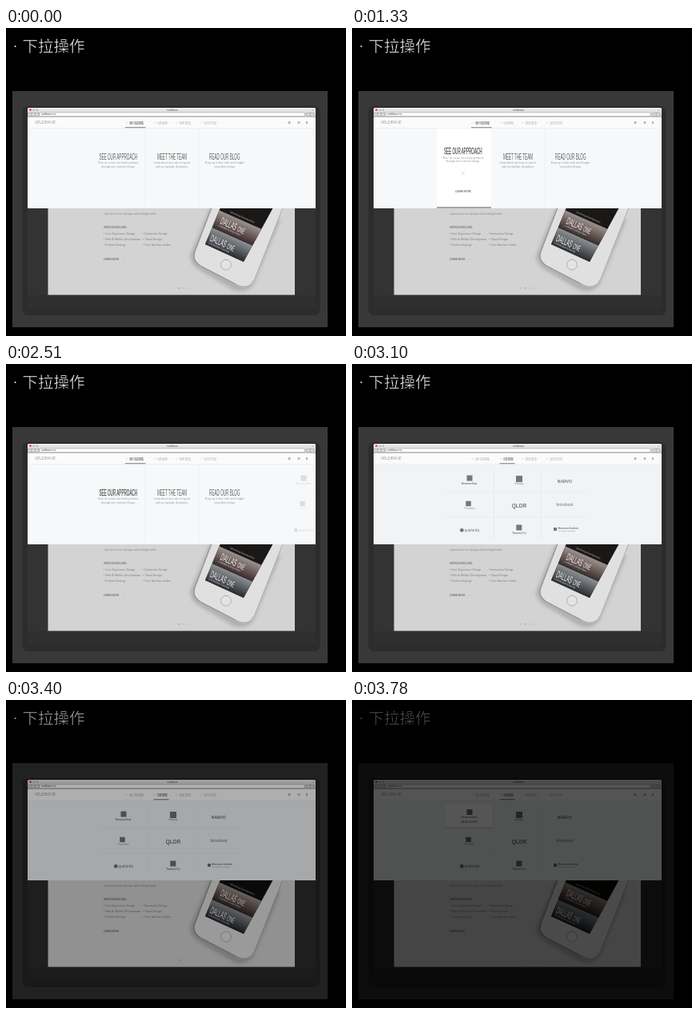
Animation of 425x386 px, one loop 3.88 s. Source, as an HTML page:

```html
<!DOCTYPE html>
<html lang="zh">
<head>
<meta charset="utf-8">
<title>下拉操作</title>
<style>
  html, body { margin: 0; width: 100%; height: 100%; overflow: hidden; background: #000; }
  svg { display: block; width: 425px; height: 386px; }
  text { white-space: pre; }
  .cjk { font-family: "Noto Sans CJK SC Light", "Noto Sans CJK SC", "Noto Sans CJK", sans-serif; font-weight: 300; }
  .sans { font-family: "Liberation Sans", Arial, sans-serif; }
  .serif { font-family: "Liberation Serif", serif; }
  .thin { font-family: Lato, sans-serif; font-weight: 300; }
  .b { font-weight: 700; }
</style>
</head>
<body>
<svg viewBox="0 0 425 386">
  <defs>
    <linearGradient id="bar" x2="0" y2="1">
      <stop stop-color="#eeeeee"/><stop offset="1" stop-color="#c5c5c5"/>
    </linearGradient>
    <linearGradient id="dusk" x2="0" y2="1">
      <stop stop-color="#9b9290"/><stop offset=".55" stop-color="#6a5855"/><stop offset="1" stop-color="#3a302f"/>
    </linearGradient>
    <linearGradient id="city" x2="0" y2="1">
      <stop stop-color="#8d9093"/><stop offset=".5" stop-color="#595c61"/><stop offset="1" stop-color="#25262a"/>
    </linearGradient>
    <filter id="soft" x="-20%" y="-20%" width="140%" height="140%"><feGaussianBlur stdDeviation="2"/></filter>
    <filter id="fade" filterUnits="userSpaceOnUse" x="0" y="0" width="425" height="386" color-interpolation-filters="sRGB">
      <feComponentTransfer>
        <feFuncR type="linear"/><feFuncG type="linear"/><feFuncB type="linear"/>
      </feComponentTransfer>
    </filter>
    <clipPath id="pageClip"><rect x="52.5" y="226" width="308.5" height="108.5"/></clipPath>
    <clipPath id="panelClip"><rect x="27" y="112" width="360" height="114"/></clipPath>
    <clipPath id="screenClip"><path d="M268 225 249 271 297 293 334 225Z"/></clipPath>
  </defs>
  <g id="stage">
    <rect width="425" height="386"/>
    <circle cx="11.5" cy="23" r="1" fill="#eee"/>
    <text class="cjk" x="20.5" y="30" font-size="19.5" fill="#f8f8f8" stroke="#000" stroke-width=".4">下拉操作</text>
    <rect x="8" y="79" width="394" height="296" fill="#383838"/>
    <rect x="20.5" y="98" width="372" height="262" rx="7" fill="#2c2c2c"/>
    <rect x="27" y="100" width="360" height="251" fill="#333"/>
    <rect x="27" y="335" width="360" height="16" fill="#2f2f2f"/>

    <g clip-path="url(#pageClip)">
      <rect x="52" y="226" width="309" height="109" fill="#d3d3d3"/>
      <g id="copy"></g>
      <path d="M255 226 231 283Q228 293 240 302L284 328Q298 334 309 322L343 240Z" fill="#8d8d8d" opacity=".5" filter="url(#soft)"/>
      <path d="M257 225 236 280Q232 291 243 298L287 321Q304 330 311 314L346 225Z" fill="#e0e0e0" stroke="#b0b0b0"/>
      <path d="M257 225 236 280Q232 291 243 298L287 321" fill="none" stroke="#989898" stroke-width="1.4"/>
      <g clip-path="url(#screenClip)">
        <g id="app" transform="translate(249 271) rotate(24)">
          <rect x="-20" y="-100" width="100" height="110" fill="#191817"/>
          <rect x="-20" y="-46" width="100" height="23" fill="url(#dusk)"/>
          <rect x="-20" y="-22.5" width="100" height="24" fill="url(#city)"/>
        </g>
      </g>
      <circle cx="275" cy="296.7" r="6.4" fill="#e4e4e4" stroke="#a9a9a9" stroke-width=".9"/>
    </g>

    <rect x="27" y="100" width="360" height="12.5" rx="1.5" fill="url(#bar)"/>
    <circle cx="30.5" cy="102.7" r="1.4" fill="#d94b43"/>
    <g fill="#dcdcdc" stroke="#888" stroke-width=".4">
      <circle cx="34.8" cy="102.7" r="1.2"/><circle cx="39" cy="102.7" r="1.2"/>
      <rect x="28" y="106.2" width="13" height="4"/>
      <rect x="42" y="106" width="331" height="4.3" fill="#fff"/>
      <rect x="376" y="106.2" width="4" height="4"/><rect x="380.5" y="106.2" width="4" height="4"/>
    </g>
    <path d="M32 106.2v4M36.5 106.2v4M382.5 104l2-2" stroke="#777" stroke-width=".5"/>
    <g id="chrome"></g>

    <rect x="27" y="112" width="360" height="114" fill="#f6f8f9" id="sheet"/>
    <g clip-path="url(#panelClip)">
      <g id="first"></g>
      <g id="second"></g>
    </g>
    <rect x="27" y="112" width="360" height="13.5" fill="#fafbfb"/>
    <path d="M27 125.5H387" stroke="#e8ebec" stroke-width=".6"/>
    <g id="nav"></g>
    <rect id="line" y="124" height="1.3" fill="#9a9a9a"/>
    <g fill="#b4b4b4">
      <rect x="352.7" y="117.2" width="2.8" height="2.8"/>
      <circle cx="366" cy="118.6" r="1.5"/>
      <rect x="375" y="117" width="2" height="3.2"/>
    </g>
  </g>
</svg>
<script>
const LOOP = 3880, NARROW = 0.44;
const STEPS = [0, 150, 300, 450, 600, 750, 890, 1040, 1190, 1330, 1480, 1630, 1780, 1930, 2080,
  2220, 2370, 2510, 2660, 2810, 2960, 3100, 3250, 3400, 3550, 3780];
const $ = id => document.getElementById(id);

function add(parent, tag, attrs, content) {
  const el = document.createElementNS('http://www.w3.org/2000/svg', tag);
  set(el, attrs);
  if (content) el.textContent = content;
  return parent.appendChild(el);
}
function set(el, attrs) {
  for (const k in attrs) el.setAttribute(k, attrs[k]);
}
const group = parent => add(parent, 'g', {});
const label = (parent, str, x, y, size, fill, cls = 'sans', anchor = 'start') =>
  add(parent, 'text', { x, y, 'font-size': size, fill, class: cls, 'text-anchor': anchor }, str);
const mid = (parent, str, x, y, size, fill, cls) => label(parent, str, x, y, size, fill, cls, 'middle');

// condensed capitals
function narrow(parent, str, x, y, size, fill, anchor = 'start') {
  const el = label(parent, str, 0, 0, size, fill, 'sans', anchor);
  set(el, { transform: `translate(${x} ${y}) scale(${NARROW} 1)` });
  return el;
}

// browser chrome and navigation
mid($('chrome'), 'veldrane', 208, 104, 3.6, '#555');
label($('chrome'), 'veldrane.is', 44, 109.4, 3.8, '#444');
label($('nav'), 'VELDRANE', 36, 120.4, 5.1, '#555', 'thin');
const items = [['WHY VELDRANE', 154.5], ['OUR WORK', 189.5], ['WHAT WE DO', 217], ['GET IN TOUCH', 247.5]]
  .map(([str, x]) => {
    add($('nav'), 'path', { d: `M${x - 5} 118.7h3`, stroke: '#ccc', 'stroke-width': .6 });
    return narrow($('nav'), str, x, 120.6, 5, '#a6a6a6');
  });

// page under the menu
const copy = $('copy');
label(copy, 'experiences for startups and leading brands.', 122, 234.3, 3.8, '#858585', 'serif');
label(copy, 'SERVICES INCLUDE:', 122, 251.2, 2.9, '#727272', 'sans b');
[['User Experience Design', 'Interaction Design'],
 ['Web & Mobile Development', 'Visual Design'],
 ['Product Strategy', 'User Interface Audits']].forEach((row, r) =>
  row.forEach((str, c) => label(copy, '• ' + str, 122 + c * 49, 258.8 + r * 7, 3.8, '#7c7c7c', 'serif')));
label(copy, 'LEARN MORE', 122, 291, 2.9, '#727272', 'sans b');
add(copy, 'path', { d: 'M145 290h4', stroke: '#b5b5b5', 'stroke-width': .5 });
const dots = group(copy);
for (let i = 0; i < 5; i++)
  add(i === 1 ? copy : dots, 'circle', { cx: 212 + i * 4.6, cy: 326, r: .8, fill: i === 1 ? '#808080' : '#b5b5b5' });

// phone captions
function caption(x, y, size, sub) {
  const app = $('app');
  narrow(app, 'DALLAS', x, y, size, '#f4f4f4');
  narrow(app, 'ONE', x + size * 1.85, y, size * .8, '#f4f4f4');
  label(app, sub, x, y + 3.6, 3, '#ddd');
}
caption(6, -31, 12.5, 'a Modern Living Place');
caption(3, -6, 12.5, 'a Downtown Evening');
label($('app'), 'Upcoming Entertainment', 12, -49, 3, '#ccc');

// first menu: three columns
const first = $('first');
add(first, 'path', { d: 'M173.5 126V225M241 126V225', stroke: '#edf0f2', 'stroke-width': .8 });
const card = group(first);
add(card, 'rect', { x: 106, y: 125.5, width: 68, height: 100.5, fill: '#fff' });
add(card, 'rect', { x: 106, y: 224, width: 68, height: 2.4, fill: '#a5a7a7' });
const columns = [
  ['SEE OUR APPROACH', 140.3, 'How we create successful products', 'through user centered design.'],
  ['MEET THE TEAM', 207.5, 'Learn about our team of experts', 'and our multiple disciplines.'],
  ['READ OUR BLOG', 273.3, 'Keep up to date with our thoughts', 'on product design.']
].map(([title, x, a, b]) => {
  const g = group(first);
  const head = narrow(g, title, x, 164.8, 10.5, '#626262', 'middle');
  mid(g, a, x, 170.3, 3.6, '#959595', 'serif');
  mid(g, b, x, 174.6, 3.6, '#959595', 'serif');
  return { g, head };
});
const more = group(first);
add(more, 'path', { d: 'M136.7 180.2l3.8 3.8m0-3.8l-3.8 3.8', stroke: '#b5b5b5', 'stroke-width': .5 });
mid(more, 'LEARN MORE', 139, 206, 3, '#777', 'sans b');

// second menu: nine clients
const second = $('second');
add(second, 'path', { d: 'M177.5 131V221M236.5 131V221M117 161H295M117 192H295', stroke: '#e6e9ea', 'stroke-width': .7 });
const tile = group(second);
add(tile, 'rect', { x: 117, y: 159, width: 58.5, height: 1.5, fill: '#c6c8c9' });
add(tile, 'rect', { x: 117, y: 131, width: 58.5, height: 28.5, fill: '#fff' });
const ink = '#757778';
const square = (g, x, y, s) => add(g, 'rect', { x: x - s / 2, y: y - s / 2, width: s, height: s, fill: ink });
const lead = group(second);
square(lead, 147, 143, 7);
mid(lead, 'Homemellow', 146.5, 150.7, 3.2, ink, 'sans b');
const study = mid(second, 'CASE STUDY', 146.5, 154, 3.3, '#777', 'sans b');
square(second, 209, 144, 8);
mid(second, 'Solvaryn', 209, 151.3, 2.8, ink);
mid(second, 'NARVO', 265.8, 149.4, 5, ink, 'sans b');
square(second, 145.5, 175, 6.5);
mid(second, 'Pendralis', 147, 182.4, 3.2, '#999');
mid(second, 'QLDR', 209, 179.6, 6.5, ink, 'sans b');
mid(second, 'brimdusk', 266, 178, 5.2, ink);
add(second, 'circle', { cx: 137.3, cy: 208.3, r: 2.4, fill: ink });
label(second, 'quelorda', 140.5, 210, 4.8, ink);
square(second, 208.8, 205, 7);
mid(second, 'Tomarsel Co', 208.8, 212.8, 2.9, ink, 'sans b');
square(second, 254, 207, 4);
label(second, 'Alvermoor Institute', 257.5, 207.3, 2.8, ink, 'sans b');
label(second, 'of Applied Wellness', 257.5, 210.2, 2.5, ink);

const clamp = v => Math.max(0, Math.min(1, v));
const smooth = (a, b, t) => { const u = clamp((t - a) / (b - a)); return u * u * (3 - 2 * u); };

function draw(t) {
  const hover = smooth(610, 1190, t) * (1 - smooth(1380, 1830, t));
  const strong = (t >= 600 && t < 1930) || t >= 2510;
  const u = clamp((t - 2510) / 450), slide = 1 - (1 - u) ** 4;
  const work = t >= 2660, entered = t >= 2510;

  set(card, { opacity: hover });
  set(more, { opacity: hover, transform: `translate(0 ${(1 - hover) * 8})` });
  set(columns[0].g, { transform: `translate(${-1.5 * hover} ${-6.4 * hover})` });
  set(columns[0].head, {
    fill: strong ? '#505050' : '#626262', stroke: '#505050',
    'stroke-width': strong ? .25 : 0
  });
  set(first, { transform: `translate(${-28 * slide} 0)`, opacity: clamp(1 - 2.2 * u) });
  set(second, { transform: `translate(${225 * (1 - slide)} 0)`, opacity: entered ? clamp(.2 + 2 * u) : 0 });
  set($('sheet'), { fill: u > .3 ? '#f1f3f4' : '#f6f8f9' });

  items.forEach((el, i) => {
    const on = i === (work ? 1 : 0);
    set(el, { fill: on ? '#606060' : '#a6a6a6', stroke: '#606060', 'stroke-width': on ? .15 : 0 });
  });
  set($('line'), { x: work ? 184.5 : 149, width: work ? 19 : 25.5 });

  const picked = t >= 3700 ? 1 : 0;
  set(tile, { opacity: picked });
  set(study, { opacity: picked });
  set(lead, { transform: `translate(0 ${-2.5 * picked})` });
  set(dots, { opacity: t >= 3250 ? .4 : 1 });

  // fade out: contrast falls steadily, blacks sink a little
  const fading = t >= 3250;
  if (fading) {
    const slope = .86 - .00094 * (t - 3250);
    for (const f of document.querySelectorAll('#fade feComponentTransfer > *')) set(f, { slope, intercept: -.025 });
  }
  set($('stage'), { filter: fading ? 'url(#fade)' : 'none' });
}

function tick() {
  const now = performance.now() % LOOP;
  draw(STEPS.filter(s => s <= now).pop());
  requestAnimationFrame(tick);
}
tick();
</script>
</body>
</html>
```
